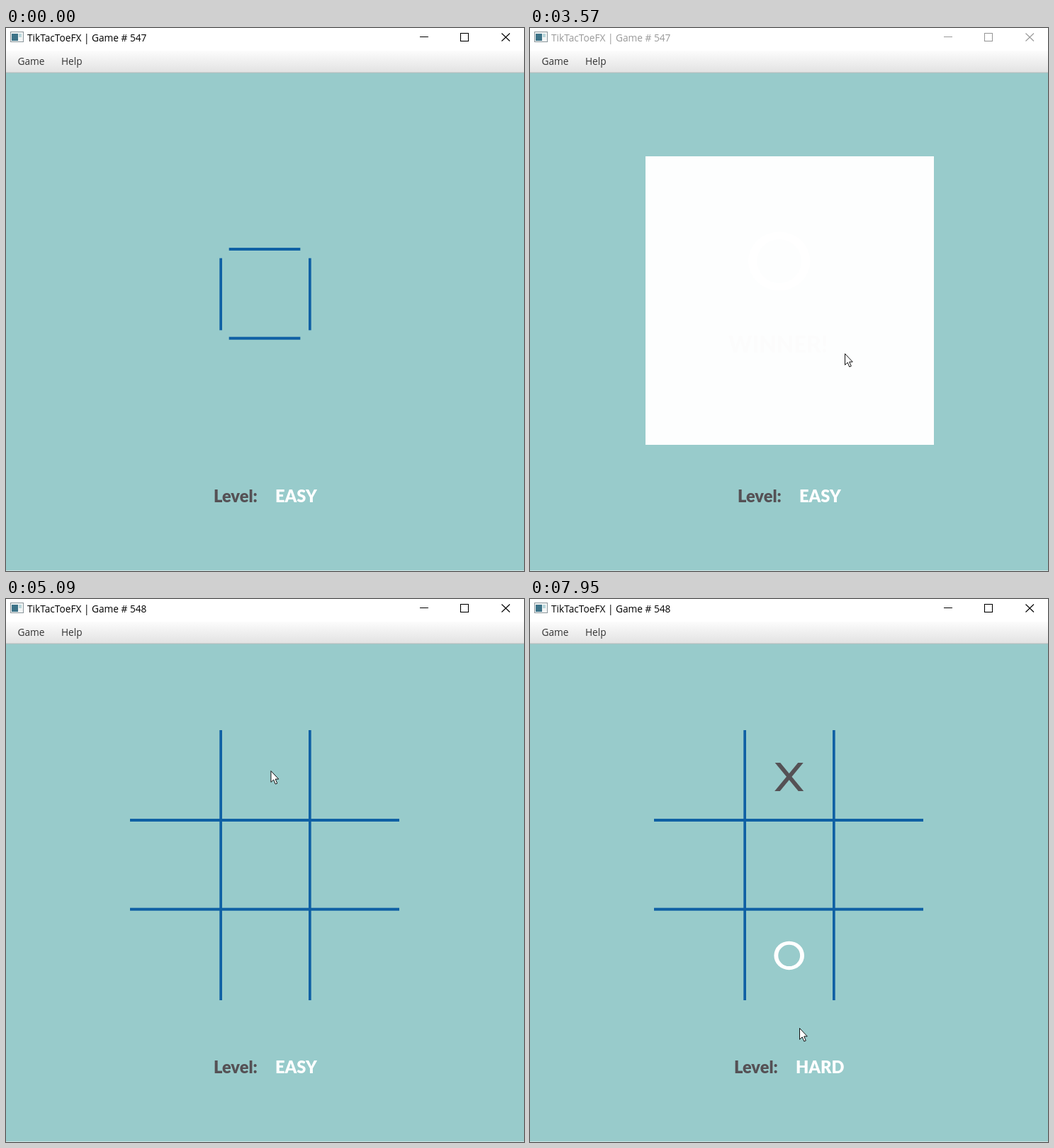
An HTML page with a canvas that plays this animation: 731x766 px, repeating every 8000 ms.

```html
<!DOCTYPE html>
<html lang="en">
<head>
<meta charset="utf-8">
<title>TikTacToeFX</title>
<style>
html, body { margin: 0; width: 100%; height: 100%; overflow: hidden; background: #98cbcb; }
canvas { display: block; }
</style>
</head>
<body>
<canvas id="stage" width="731" height="766"></canvas>
<script>
const ctx = document.getElementById('stage').getContext('2d');
const LOOP = 8000, BACK = '#98cbcb', DARK = '#555155', LINE = '#0f60a4', BLUE = '#0096c9';
const UI = '13.7px "Open Sans", "Noto Sans", sans-serif';
const LABEL = '900 23.6px Lato, sans-serif', BANNER = '900 31.5px Lato, sans-serif';

const DIALOG_OPEN = 3500, DIALOG_CLOSE = 4260;
const MENU_HOVER = 6130, MENU_OPEN = 6550, MENU_CLOSE = 7250;
const CELL = 125.7, LEFT = 240, TOP = 251;
const CLICK_TIME = 140, REPLY_DELAY = 130;

// Pointer stops; a click on the board plays X there and O answers in cell `reply`
const STOPS = [
  { at: 950, x: 405, y: 372 },
  { at: 1220, x: 278, y: 238 },
  { at: 1510, x: 255, y: 250, click: true, reply: 6 },
  { at: 1910, x: 364, y: 376, click: true, reply: 7 },
  { at: 2340, x: 492, y: 385, click: true, reply: 3 },
  { at: 2740, x: 446, y: 396 },
  { at: 3220, x: 372, y: 240, click: true, reply: 8 },
  { at: 3570, x: 444, y: 459 },
  { at: 4090, x: 443, y: 460, click: true },
  { at: 4830, x: 423, y: 383 },
  { at: 5170, x: 372, y: 238, click: true, reply: 7 },
  { at: 5650, x: 224, y: 253 },
  { at: 6300, x: 40, y: 49, click: true },
  { at: 6750, x: 40, y: 49 },
  { at: 7110, x: 177, y: 120, click: true },
  { at: 7560, x: 177, y: 119 },
  { at: 7950, x: 380, y: 605 }
];

const within = (t, a, b) => t >= a && t < b;
const clamp = k => Math.max(0, Math.min(1, k));
const ease = k => k * k * (3 - 2 * k);

function rect(x, y, w, h, fill) {
  ctx.fillStyle = fill;
  ctx.fillRect(x, y, w, h);
}

function text(str, x, y, font, fill) {
  ctx.font = font;
  ctx.fillStyle = fill;
  ctx.fillText(str, x, y);
}

function drawX(x, y) {
  ctx.fillStyle = DARK;
  for (const s of [-1, 1]) {
    ctx.beginPath();
    ctx.moveTo(x - 20 * s, y - 20);
    ctx.lineTo(x - 12.5 * s, y - 20);
    ctx.lineTo(x + 20.5 * s, y + 20);
    ctx.lineTo(x + 13 * s, y + 20);
    ctx.fill();
  }
}

function drawO(x, y, scale) {
  ctx.fillStyle = '#fff';
  ctx.beginPath();
  ctx.ellipse(x, y, 43.5 * scale, 41.3 * scale, 0, 0, 7);
  ctx.closePath();
  ctx.ellipse(x, y, 31.5 * scale, 31 * scale, 0, 0, 7);
  ctx.fill('evenodd');
}

function drawIcon() {
  rect(6, 5, 19, 15, '#8c979c');
  rect(7, 6, 17, 13, '#f2f5f5');
  rect(8, 8, 9, 10, '#3d7388');
  rect(18, 8, 4, 5, '#b9d6da');
}

function drawWindow(t) {
  const ink = within(t, DIALOG_OPEN, DIALOG_CLOSE) ? '#999' : '#000';
  rect(0, 0, 731, 766, BACK);
  rect(0, 765, 731, 1, '#cfe5e5');
  rect(0, 0, 731, 32, '#fff');
  drawIcon();
  text('TikTacToeFX | Game # ' + (t < DIALOG_CLOSE ? 547 : 548), 30, 18.5, UI, ink);

  ctx.strokeStyle = ink;
  ctx.lineWidth = 1.1;
  ctx.strokeRect(641.5, 7.5, 11, 11);
  ctx.beginPath();
  ctx.moveTo(584, 12.5); ctx.lineTo(596, 12.5);
  ctx.moveTo(699.5, 7.5); ctx.lineTo(711, 18.5);
  ctx.moveTo(711, 7.5); ctx.lineTo(699.5, 18.5);
  ctx.stroke();

  const bar = ctx.createLinearGradient(0, 32, 0, 63);
  bar.addColorStop(0, '#fcfcfc');
  bar.addColorStop(1, '#e2e2e2');
  rect(0, 32, 731, 31, bar);
  rect(0, 62.5, 731, 1, '#b5bcbc');
  const active = within(t, MENU_HOVER, MENU_CLOSE);
  if (active) rect(7, 31, 58, 32, BLUE);
  text('Game', 16.5, 52, UI, active ? '#fff' : '#333');
  text('Help', 78, 52, UI, '#333');

  const hard = t >= MENU_CLOSE;
  text('Level:', hard ? 288 : 293, 669, LABEL, DARK);
  text(hard ? 'HARD' : 'EASY', hard ? 375 : 380, 669, LABEL, '#fff');
}

function drawGrid(t) {
  const grown = t < DIALOG_OPEN ? 100 + t * 2 / 3 : (t - DIALOG_CLOSE) * 2 / 3;
  const len = Math.min(380, grown);
  for (const i of [0, 1]) {
    rect(365 - len / 2, 310 + i * CELL, len, 4, LINE);
    rect(301.3 + i * CELL, 375 - len / 2, 3.7, len + 1, LINE);
  }
}

function drawMarks(t) {
  const from = t < DIALOG_OPEN ? 0 : DIALOG_CLOSE;
  const snap = (v, first) => first + Math.round((v - first) / CELL) * CELL;
  for (const { at, x, y, reply } of STOPS) {
    if (reply === undefined || at < from) continue;
    if (t >= at + 40) drawX(snap(x, LEFT), snap(y, TOP));
    if (t >= at + REPLY_DELAY)
      drawO(LEFT + reply % 3 * CELL, TOP + .5 + Math.floor(reply / 3) * CELL, .49);
  }
}

function drawDialog(t) {
  drawO(351.7, 329, 1);
  text('WINNER!', 280, 457.5, BANNER, '#555');
  ctx.globalAlpha = clamp(1 - (t - 3566) / 300);
  rect(163, 181, 407, 407, '#fff');
  ctx.globalAlpha = 1;
}

function drawMenu(t, pointerY) {
  ctx.globalAlpha = t < 6610 ? .6 : 1;
  ctx.shadowColor = 'rgba(0,0,0,.3)';
  ctx.shadowBlur = 7;
  rect(9, 66, 200, 110, '#f2f2f2');
  ctx.shadowBlur = 0;
  ['New Game', 'Change Level', 'Exit'].forEach((item, i) => {
    const top = 70 + i * 34, over = within(pointerY, top, top + 34);
    if (over) rect(9, top, 200, 34, BLUE);
    text(item, 20, top + 22, UI, over ? '#fff' : '#333');
  });
  ctx.globalAlpha = 1;
}

// The pointer rests around each click and eases between stops
function pointerAt(t) {
  const i = STOPS.findIndex(s => s.at > t);
  if (i < 0) return STOPS[STOPS.length - 1];
  const a = STOPS[i - 1], b = STOPS[i];
  const leave = a.at + (a.click ? CLICK_TIME : 0);
  const arrive = b.at - (b.click ? 50 : 0);
  const k = ease(clamp((t - leave) / (arrive - leave)));
  return { x: a.x + (b.x - a.x) * k, y: a.y + (b.y - a.y) * k };
}

const ARROW = new Path2D('M.5.5V16.3L4.2 12.9L6.8 19L9.3 18L6.7 12H11.3Z');

function drawPointer(t, { x, y }) {
  ctx.save();
  ctx.translate(x, y);
  ctx.fillStyle = '#fff';
  ctx.fill(ARROW);
  ctx.strokeStyle = '#111';
  ctx.lineWidth = 1;
  ctx.stroke(ARROW);
  if (STOPS.some(s => s.click && within(t, s.at, s.at + CLICK_TIME))) {
    ctx.fillStyle = 'rgba(255,245,0,.48)';
    ctx.beginPath();
    ctx.arc(0, 0, 15, 0, 7);
    ctx.fill();
  }
  ctx.restore();
}

function draw(t) {
  drawWindow(t);
  if (within(t, DIALOG_OPEN, DIALOG_CLOSE)) {
    drawDialog(t);
  } else {
    drawGrid(t);
    drawMarks(t);
  }
  if (t < STOPS[0].at) return;
  const pointer = pointerAt(t);
  if (within(t, MENU_OPEN, MENU_CLOSE)) drawMenu(t, pointer.y);
  drawPointer(t, pointer);
}

const start = performance.now();
function tick() {
  draw((performance.now() - start) % LOOP);
  requestAnimationFrame(tick);
}
tick();
</script>
</body>
</html>
```
